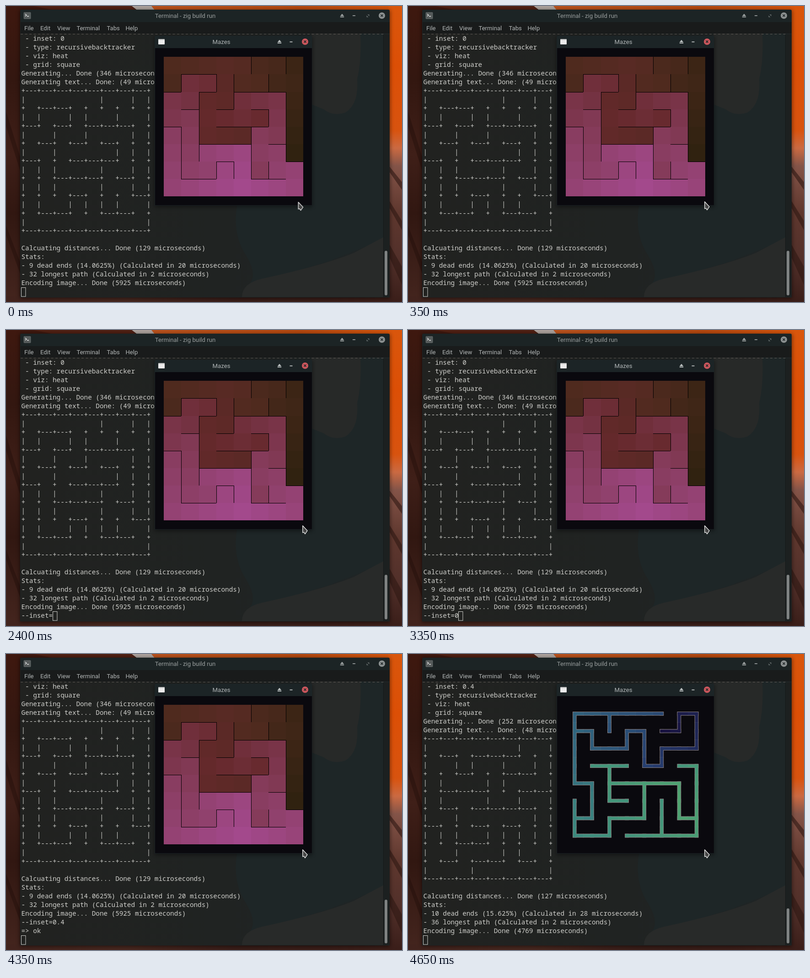
These frames come from a looping animation (866 px wide and 647 px high, 8 s). An HTML page:

```html
<!DOCTYPE html>
<html lang="en">
<head>
<meta charset="utf-8">
<title>Maze terminal</title>
<style>
  html, body { margin: 0; width: 100%; height: 100%; overflow: hidden; background: #361c17; }
  svg { display: block; width: 866px; height: 647px; }
  text { white-space: pre; }
  .ui { font: 13.1px Roboto, "Noto Sans", sans-serif; fill: #b4b8b8; }
  .title { font-size: 13.2px; fill: #9a9f9f; text-anchor: middle; }
  #lines { font: 500 14.29px "Noto Sans Mono", "DejaVu Sans Mono", monospace; fill: #d0d0cc; }
  .crisp { shape-rendering: crispEdges; }
  #pointer { animation: drift 8s infinite step-end; }
  @keyframes drift {
    0% { transform: translate(638.5px, 428px); }
    0.625% { transform: translate(641px, 429.5px); }
    1.25% { transform: translate(643.5px, 430px); }
    3.75% { transform: translate(646px, 428.5px); }
    4.375%, 100% { transform: translate(648px, 427px); }
  }
</style>
</head>
<body>
<svg id="stage" viewBox="0 0 866 647" xmlns="http://www.w3.org/2000/svg">
  <defs>
    <linearGradient id="leftRock" x2="0" y2="1">
      <stop offset="0" stop-color="#3e180f"/><stop offset=".25" stop-color="#331710"/>
      <stop offset=".5" stop-color="#3f1f18"/><stop offset=".7" stop-color="#311711"/>
      <stop offset="1" stop-color="#44251e"/>
    </linearGradient>
    <linearGradient id="rightRock" x2="0" y2="1">
      <stop offset="0" stop-color="#d9560c"/><stop offset=".2" stop-color="#dc4f06"/>
      <stop offset=".42" stop-color="#d8530f"/><stop offset=".48" stop-color="#cb6a42"/>
      <stop offset=".54" stop-color="#845448"/><stop offset=".7" stop-color="#5e372e"/>
      <stop offset=".85" stop-color="#52302a"/><stop offset="1" stop-color="#3a1e19"/>
    </linearGradient>
    <linearGradient id="floorRock">
      <stop offset="0" stop-color="#41231d"/><stop offset=".3" stop-color="#47271f"/>
      <stop offset=".6" stop-color="#381d18"/><stop offset="1" stop-color="#3c1f19"/>
    </linearGradient>
    <linearGradient id="topRock">
      <stop offset="0" stop-color="#b9521d"/><stop offset=".6" stop-color="#b4480f"/>
      <stop offset="1" stop-color="#d9560c"/>
    </linearGradient>
    <linearGradient id="body">
      <stop offset="0" stop-color="#212220"/><stop offset=".55" stop-color="#202322"/>
      <stop offset="1" stop-color="#1f2526"/>
    </linearGradient>
    <filter id="soft" x="-10%" y="-10%" width="120%" height="120%"><feGaussianBlur stdDeviation="4"/></filter>
    <clipPath id="pane"><rect x="32" y="60" width="794" height="576"/></clipPath>
    <g id="eject"><path d="M0-4L4.2 1H-4.2Z"/><rect x="-4.2" y="2" width="8.4" height="1.8"/></g>
    <g id="close"><circle r="7"/><path d="M-2.5-2.5L2.5 2.5M2.5-2.5L-2.5 2.5" stroke="#1d2426" stroke-width="1.6"/></g>
  </defs>

  <!-- wallpaper -->
  <rect width="866" height="647" fill="url(#leftRock)"/>
  <rect y="634" width="866" height="13" fill="url(#floorRock)"/>
  <path d="M318 0H866V12H326Z" fill="url(#topRock)"/>
  <path d="M60 0H275L285 10H110Z" fill="#4f2013"/>
  <path d="M275 0H318L326 10H288Z" fill="#aca29d"/>
  <rect x="836" width="30" height="647" fill="url(#rightRock)"/>
  <path d="M838 350L866 385V402L838 362ZM838 425L866 470V490L838 440ZM838 520L866 570V610L838 548Z" fill="#2f1813" opacity=".6"/>
  <path d="M0 230L31 330V360L0 262ZM0 480L31 560V585L0 500Z" fill="#220e0a" opacity=".45"/>

  <!-- terminal window -->
  <rect x="30" y="9" width="810" height="630" fill="#000" opacity=".5" filter="url(#soft)"/>
  <path d="M31 637V11Q31 8 34 8H836Q839 8 839 11V637Z" fill="#1c2425"/>
  <rect x="32" y="35" width="807" height="27" fill="#191b1b"/>
  <rect x="32" y="60" width="807" height="576" fill="url(#body)"/>
  <g clip-path="url(#pane)">
    <path d="M505 436Q495 500 525 545Q552 590 530 610L700 560L826 510V60H668V436Z" fill="#1e2627"/>
    <path d="M668 60H775Q778 120 768 160Q772 215 742 233Q715 242 695 226L668 215Z" fill="#272928"/>
    <path d="M516 636Q516 606 560 596Q690 568 760 540L826 505V636Z" fill="#282a29"/>
  </g>
  <path d="M32 61.5H826" stroke="#5f5a56" stroke-dasharray="5 4.5"/>
  <path d="M826 62H839V636H826Z" fill="#1c2020"/>
  <path d="M825.5 62V636" stroke="#151818"/>
  <rect id="thumb" x="828" width="6" rx="3" fill="#7f8282"/>

  <rect x="39" y="14" width="15" height="14" rx="1" fill="#555a5a" stroke="#777c7c" stroke-width=".6"/>
  <path d="M42 17.5L45 20L42 22.5M46 22.5H50" fill="none" stroke="#eee" stroke-width="1.3"/>
  <g fill="#a2a7a7">
    <use href="#eject" x="735" y="21"/>
    <rect x="758" y="20.4" width="6" height="1.6"/>
    <path d="M790.5 18.5H794.5V22.5ZM788.5 20.5V24.5H792.5Z" opacity=".55"/>
    <use href="#close" x="822" y="21" fill="#8c9191"/>
  </g>
  <text class="ui title" x="392" y="25.5">Terminal - zig build run</text>
  <g class="ui" id="menu"></g>
  <g id="lines"></g>
  <rect id="caret" y="615.5" width="9.4" height="19.5" fill="none" stroke="#d0d0cc"/>

  <!-- maze window -->
  <rect x="325" y="67" width="345" height="372" fill="#000" opacity=".45" filter="url(#soft)"/>
  <path d="M325 436.5V68Q325 65 328 65H666.5Q669.5 65 669.5 68V436.5Z" fill="#1c2426"/>
  <rect x="326" y="92" width="343" height="343.5" fill="#0a090e"/>
  <rect x="333" y="72.5" width="14" height="11.5" rx="1" fill="#ececec"/>
  <rect x="333" y="72.5" width="14" height="2" fill="#c9caca"/>
  <text class="ui title" x="471" y="83" style="fill:#b2b7b8">Mazes</text>
  <g fill="#c3c8c8">
    <use href="#eject" x="598" y="78"/>
    <rect x="620.5" y="77.6" width="6" height="1.7"/>
    <use href="#close" x="654" y="78" fill="#cc575d"/>
  </g>
  <g id="heat" class="crisp"></g>
  <g id="paths"></g>

  <path id="pointer" d="M.8 .8V16L3.6 15.2L6 18.8L11 11.6Z"
        fill="#464646" stroke="#f4f4f4" stroke-width="1.3" stroke-linejoin="round"/>
</svg>

<script>
const $ = id => document.getElementById(id);
const add = (parent, tag, attrs, text = '') => {
  const el = document.createElementNS('http://www.w3.org/2000/svg', tag);
  for (const k in attrs) el.setAttribute(k, attrs[k]);
  el.textContent = text;
  return parent.appendChild(el);
};

// right: walls by the column they precede; below: columns closed underneath
const N = 8, CELL = 38.1, LEFT = 345.3, TOP = 111.3;
const mazeA = {
  right: ['57', '1346', '247', '267', '1257', '1257', '13456', ''],
  below: ['12', '02456', '135', '0345', '2346', '37', '1256', '01234567'],
  start: [7, 4],
  ramp: [[163, 73, 140], [134, 60, 92], [102, 41, 44], [78, 42, 30], [48, 34, 16]]
};
const mazeB = {
  right: ['6', '2357', '145', '146', '27', '124567', '256', '3'],
  below: ['1345', '256', '12367', '13456', '035', '23', '1346', '01234567'],
  start: [5, 6],
  ramp: [[80, 164, 112], [62, 144, 126], [50, 104, 128], [38, 62, 112], [24, 18, 64]]
};

const openRight = (m, r, c) => c >= 0 && c < N - 1 && !m.right[r].includes(c + 1);
const openBelow = (m, r, c) => r >= 0 && r < N - 1 && !m.below[r].includes(c);

function distances(m) {
  const dist = Array.from({ length: N }, () => Array(N).fill(-1));
  const queue = [m.start];
  dist[m.start[0]][m.start[1]] = 0;
  for (const [r, c] of queue) {
    const next = [
      openRight(m, r, c) && [r, c + 1], openRight(m, r, c - 1) && [r, c - 1],
      openBelow(m, r, c) && [r + 1, c], openBelow(m, r - 1, c) && [r - 1, c]
    ];
    for (const p of next) {
      if (!p || dist[p[0]][p[1]] >= 0) continue;
      dist[p[0]][p[1]] = dist[r][c] + 1;
      queue.push(p);
    }
  }
  return dist;
}

function eachCell(m, draw) {
  const dist = distances(m), max = Math.max(...dist.flat());
  for (let r = 0; r < N; r++) for (let c = 0; c < N; c++) {
    const f = dist[r][c] / max * (m.ramp.length - 1);
    const i = Math.min(Math.floor(f), m.ramp.length - 2);
    const rgb = m.ramp[i].map((v, k) => Math.round(v + (m.ramp[i + 1][k] - v) * (f - i)));
    draw(r, c, LEFT + c * CELL, TOP + r * CELL, `rgb(${rgb})`);
  }
}

function drawHeat(m, g) {
  let walls = '';
  eachCell(m, (r, c, x, y, fill) => {
    const x0 = Math.round(x), y0 = Math.round(y);
    const x1 = Math.round(x + CELL), y1 = Math.round(y + CELL);
    add(g, 'rect', { x: x0, y: y0, width: x1 - x0, height: y1 - y0, fill });
    if (c < N - 1 && !openRight(m, r, c)) walls += `M${x1 + .5} ${y0}V${y1}`;
    if (r < N - 1 && !openBelow(m, r, c)) walls += `M${x0} ${y1 + .5}H${x1}`;
  });
  add(g, 'path', { d: walls, stroke: '#000' });
}

function drawPaths(m, g) {
  const inset = CELL * .4;
  const edge = add(g, 'g', { fill: '#8a8080' }), core = add(g, 'g', {});
  const box = (parent, x0, y0, x1, y1, fill) =>
    add(parent, 'rect', { x: x0, y: y0, width: x1 - x0, height: y1 - y0, ...(fill && { fill }) });
  eachCell(m, (r, c, x, y, fill) => {
    const a = inset, b = CELL - inset;
    const w = openRight(m, r, c - 1) ? 0 : a, e = openRight(m, r, c) ? CELL : b;
    const n = openBelow(m, r - 1, c) ? 0 : a, s = openBelow(m, r, c) ? CELL : b;
    for (const [x0, y0, x1, y1] of [[w, a, e, b], [a, n, b, s]]) {
      const q = [x + x0, y + y0, x + x1, y + y1];
      box(edge, q[0] - .5, q[1] - .5, q[2] + .5, q[3] + .5);
      // open ends overlap a little so that no seam shows
      const pad = (v, lim, sign) => v === lim ? sign * .1 : -sign * .5;
      box(core, q[0] + pad(x0, 0, -1), q[1] + pad(y0, 0, -1),
        q[2] + pad(x1, CELL, 1), q[3] + pad(y1, CELL, 1), fill);
    }
  });
}

function mazeText(m) {
  const out = ['+' + '---+'.repeat(N)];
  for (let r = 0; r < N; r++) {
    let mid = '|', low = '+';
    for (let c = 0; c < N; c++) {
      mid += '   ' + (openRight(m, r, c) ? ' ' : '|');
      low += (openBelow(m, r, c) ? '   ' : '---') + '+';
    }
    out.push(mid, low);
  }
  return out;
}

const report = (m, inset, gen, text, dist, ends, path, image) => [
  ` - inset: ${inset}`, ' - type: recursivebacktracker', ' - viz: heat', ' - grid: square',
  `Generating... Done (${gen} microseconds)`,
  `Generating text... Done: (${text} microseconds)`,
  ...mazeText(m), '',
  `Calcuating distances... Done (${dist} microseconds)`, 'Stats:',
  `- ${ends} microseconds)`,
  `- ${path} longest path (Calculated in 2 microseconds)`,
  `Encoding image... Done (${image} microseconds)`
];
const before = report(mazeA, '0', 346, 49, 129, '9 dead ends (14.0625%) (Calculated in 20', 32, 5925);
const after = report(mazeB, '0.4', 252, 48, 127, '10 dead ends (15.625%) (Calculated in 28', 36, 4769);

const command = '--inset=0.4';
const keys = [1750, 1950, 2000, 2100, 2150, 2200, 2400, 3350, 3600, 4250];

function screen(t) {
  if (t >= 4650) return [...after, ''];
  if (t >= 4350) return [...before, command, '=> ok', ''];
  if (t >= 4300) return [...before, command, ''];
  const hit = keys.filter(k => t >= k).length;
  return [...before, command.slice(0, hit && hit + 1)];
}

const ROWS = 30, PITCH = 19.1, ADVANCE = 8.574;
const rows = Array.from({ length: ROWS }, (_, i) =>
  add($('lines'), 'text', { x: 33.5, y: (75.5 + i * PITCH).toFixed(1) }));
[['File', 40], ['Edit', 75], ['View', 112], ['Terminal', 154.5], ['Tabs', 220.5], ['Help', 261.5]]
  .forEach(([label, x]) => add($('menu'), 'text', { x, y: 52.5 }, label));
drawHeat(mazeA, $('heat'));
drawPaths(mazeB, $('paths'));

function render(t) {
  const lines = screen(t).slice(-ROWS);
  rows.forEach((el, i) => { if (el.textContent !== lines[i]) el.textContent = lines[i]; });
  $('caret').setAttribute('x', Math.round(33 + lines[ROWS - 1].length * ADVANCE) + .5);
  const top = t >= 4600 ? 556 : t >= 4350 ? 537 : t >= 4300 ? 536 : 535;
  $('thumb').setAttribute('y', top);
  $('thumb').setAttribute('height', 632.5 - top);
  $('heat').style.display = t < 4600 ? '' : 'none';
  $('paths').style.display = t < 4600 ? 'none' : '';
}

const origin = performance.now();
const tick = () => {
  render((performance.now() - origin) % 8000);
  requestAnimationFrame(tick);
};
tick();
</script>
</body>
</html>
```
